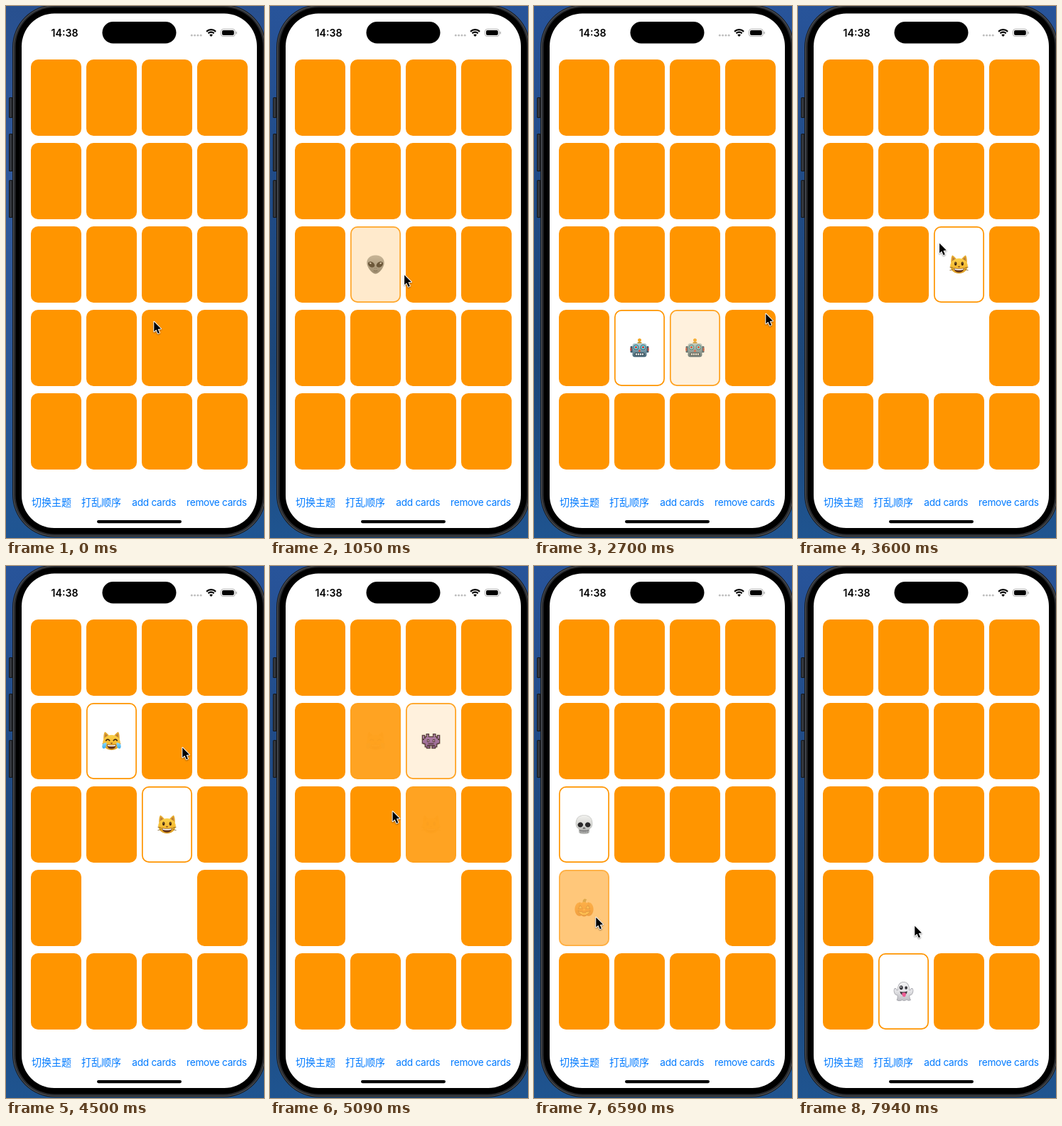
An HTML page with a canvas that plays this animation: 363 px wide and 746 px high, repeating every 8000 ms.

```html
<!DOCTYPE html>
<html lang="zh">
<head>
<meta charset="utf-8">
<title>Memory cards</title>
<style>
  html, body { margin: 0; width: 100%; height: 100%; overflow: hidden; background: #1d477e; }
  canvas { display: block; width: 363px; height: 746px; }
</style>
</head>
<body>
<canvas id="stage"></canvas>
<script>
const W = 363, H = 746, LOOP = 8000, STEP = 150, FADE = 350;
const ORANGE = '#ff9500', BLUE = '#007aff';
const canvas = document.getElementById('stage');
const ratio = window.devicePixelRatio || 1;
canvas.width = W * ratio;
canvas.height = H * ratio;
const stage = canvas.getContext('2d');

// ---------- drawing helpers ----------
function box(g, x, y, w, h, r, fill) {
  g.beginPath();
  g.roundRect(x, y, w, h, r);
  if (fill) { g.fillStyle = fill; g.fill(); }
}
function oval(g, x, y, rx, ry, fill, tilt = 0) {
  g.beginPath();
  g.ellipse(x, y, rx, ry, tilt, 0, Math.PI * 2);
  g.fillStyle = fill;
  g.fill();
}
function shape(g, d, fill, stroke, width = 1) {
  const p = new Path2D(d);
  if (fill) { g.fillStyle = fill; g.fill(p); }
  if (stroke) { g.strokeStyle = stroke; g.lineWidth = width; g.stroke(p); }
}
function mirror(g, draw) {
  draw();
  g.save(); g.scale(-1, 1); draw(); g.restore();
}
function shade(g, y0, y1, ...colors) {
  const s = g.createLinearGradient(0, y0, 0, y1);
  colors.forEach((c, i) => s.addColorStop(i / (colors.length - 1), c));
  return s;
}

// ---------- emoji, centred on 0,0, about 26 px wide ----------
function catHead(g) {
  mirror(g, () => {
    shape(g, 'M-11 1 Q-12 -9 -9.5 -13 Q-7 -12 -3 -7 Z', '#e5a92e');
    shape(g, 'M-9.5 -4 L-8.8 -10.5 L-5 -7 Z', '#b97a3a');
  });
  oval(g, 0, 2, 12.3, 10.6, shade(g, -9, 13, '#fbd24c', '#f6bd35', '#d99a25'));
  mirror(g, () => shape(g, 'M-8 5 L-13 3.5 M-8 7 L-13 8', null, '#7c5a20', .7));
  shape(g, 'M-1.8 2.4 L1.8 2.4 L0 4.2 Z', '#7a4021');
}

const emoji = {
  alien(g) {
    shape(g, 'M0 -13 C8 -13 12.5 -8 12.2 -2 C12 4 5 13 0 13 C-5 13 -12 4 -12.2 -2 C-12.5 -8 -8 -13 0 -13 Z',
      shade(g, -13, 13, '#a9adac', '#8c9190', '#686d6d'));
    mirror(g, () => {
      oval(g, -5.9, 0, 5.1, 3.6, '#191b1c', .55);
      oval(g, -7.2, -1.8, 1.4, .9, '#d8dddd', .5);
      oval(g, -1, 5.3, .5, .7, '#484c4c');
    });
    shape(g, 'M-2.8 8.4 Q0 10 2.8 8.4', null, '#3c4040', 1);
  },
  cat(g) {
    catHead(g);
    mirror(g, () => {
      oval(g, -4.8, -1.2, 1.7, 2.7, '#40270f');
      oval(g, -5.1, -2.2, .6, .8, '#a98755');
    });
    shape(g, 'M-7 5 Q0 6.7 7 5 Q6.4 11 0 11 Q-6.4 11 -7 5 Z', '#603018');
    shape(g, 'M-6.3 5.6 Q0 7 6.3 5.6 L5.8 7.4 Q0 8.6 -5.8 7.4 Z', '#fff');
  },
  tears(g) {
    catHead(g);
    shape(g, 'M-6.5 4.6 Q0 6.2 6.5 4.6 Q6 11 0 11 Q-6 11 -6.5 4.6 Z', '#603018');
    shape(g, 'M-5.8 5.2 Q0 6.5 5.8 5.2 L5.3 7 Q0 8 -5.3 7 Z', '#fff');
    mirror(g, () => {
      shape(g, 'M-8.2 -.2 Q-5.5 -4.5 -2.4 -.2', null, '#40270f', 1.6);
      shape(g, 'M-7 2 Q-13.6 2.5 -13.2 8 Q-12.6 11.6 -9.3 10 Q-7 8 -7 2 Z',
        shade(g, 2, 11, '#8edcff', '#35a9ec'));
    });
  },
  robot(g) {
    box(g, -1, -10, 2, 4, 0, '#83939b');
    box(g, -3, -8.4, 6, 2.5, 1, '#c59a35');
    oval(g, 0, -11, 2.5, 2.3, '#f3a51c');
    mirror(g, () => {
      box(g, -13, -2.5, 3.5, 9, 1.4, '#39596c');
      oval(g, -12.2, 2, 1.1, 2.8, '#bd4a3e');
    });
    box(g, -10, -6.5, 20, 19.3, 3, shade(g, -6.5, 13, '#b4d0d8', '#779ba8', '#486575'));
    mirror(g, () => {
      oval(g, -5, -1, 3.7, 3.7, '#304955');
      oval(g, -5, -1, 3, 3, '#70e4f1');
      oval(g, -5, -1, 1.5, 1.5, '#d8302a');
    });
    shape(g, 'M0 2 L2 5.2 L-2 5.2 Z', '#df4b35');
    box(g, -6.8, 6.8, 13.6, 4, 1.2, '#283a43');
    for (let x = -5.7; x < 5; x += 3) box(g, x, 7.6, 2.3, 2.4, .3, '#e8eff0');
  },
  monster(g) {
    const body = (grow, fill) => mirror(g, () => {
      const part = (x, y, w, h) => box(g, x - grow, y - grow, w + grow * 2, h + grow * 2, 0, fill);
      part(-7.6, -5.4, 7.6, 11);
      part(-9.5, -3.4, 2, 6.8);
      part(-11.5, -1.4, 2, 4);
      part(-11.5, -7.4, 2, 4);
      part(-5.7, -9.2, 2, 4);
      part(-7.6, 5.6, 2.2, 2);
      part(-5.4, 7.6, 3.4, 1.8);
    });
    body(1.3, '#211528');
    body(0, shade(g, -9, 9, '#9b70bb', '#754499'));
    mirror(g, () => {
      box(g, -5.6, -2.4, 3.2, 3.8, 0, '#21142a');
      box(g, -4.6, -1.4, 1.3, 1.8, 0, '#d8b0e8');
      box(g, -4, 3, 4, 1.6, 0, '#2d1939');
    });
  },
  skull(g) {
    const bone = shade(g, -13, 13, '#f1f1ee', '#d7d8d5', '#a7a8a5');
    shape(g, 'M0 -13 C9 -13 12 -7 11.5 0 C11.2 4 9 5 7.5 6 L7 11 Q6 13 0 13 Q-6 13 -7 11 L-7.5 6 C-9 5 -11.2 4 -11.5 0 C-12 -7 -9 -13 0 -13 Z',
      bone, '#b7b8b5', .6);
    mirror(g, () => {
      oval(g, -5.2, .4, 3.8, 3.5, '#29282a', -.2);
      shape(g, 'M-.3 3.2 L-1.8 6 L-.3 6 Z', '#343234');
    });
    shape(g, 'M-6.5 8.2 Q0 9.6 6.5 8.2', null, '#5d5c5d', .9);
    for (let x = -4.5; x <= 4.5; x += 3) shape(g, `M${x} 7.8 V11.8`, null, '#747374', .7);
  },
  pumpkin(g) {
    shape(g, 'M-2 -8 Q-2 -12 1 -13 L4 -11.8 Q2 -10.5 2.5 -7 Z', '#75813a');
    const skin = shade(g, -9, 12, '#f6a02c', '#e87910', '#b9500b');
    mirror(g, () => oval(g, -6.3, 1.8, 6.8, 9.6, skin));
    oval(g, 0, 1.8, 6.8, 10.3, skin);
    mirror(g, () => {
      shape(g, 'M-5.8 -8 Q-9.5 1 -6 11', null, '#c35d0b', .7);
      shape(g, 'M-8 1 L-5.2 -4 L-2.5 .8 Z', '#ffe151', '#78340a', .7);
    });
    shape(g, 'M0 1 L1.5 3.2 L-1.5 3.2 Z', '#ffe151');
    shape(g, 'M-8.5 4 Q-4 6 -3 5 L-2 6.8 L2 6.8 L3 5 Q4 6 8.5 4 Q6 10 0 10 Q-6 10 -8.5 4 Z', '#ffe151', '#78340a', .7);
  },
  ghost(g) {
    shape(g, 'M0 -13 C6.4 -13 8 -8 8 -2 Q10 -1 10.6 -4 Q13.4 -5 13.5 -1 Q13 5 8.4 5.5 Q8.2 10 10 12 Q6.8 13.8 4.5 11.5 Q1 14.5 -2 12 Q-6 14.5 -9.4 12 Q-8 9 -8.4 5.5 Q-13 5 -13.5 -1 Q-13.4 -5 -10.6 -4 Q-10 -1 -8 -2 C-8 -8 -6.4 -13 0 -13 Z',
      shade(g, -13, 13, '#f4f4f5', '#e3e3e6', '#bcbcc2'), '#a6a6ac', .8);
    oval(g, -3.3, -5.3, 2.5, 3, '#333238');
    oval(g, 3.6, -5, 1.8, 2.1, '#333238');
    oval(g, -3.7, -6, .8, 1, '#eee');
    shape(g, 'M-5.2 .1 Q0 1.8 5.2 -.3 Q5 5 0 5 Q-4.2 5 -5.2 .1 Z', '#39323a');
    shape(g, 'M-2.4 2.4 Q.5 1 3.3 2.2 L3 6.4 Q1 9 -1.5 6.5 Z', '#ee5d94');
  }
};

const SPRITE = 34, DETAIL = 2 * ratio;
const sprites = {};
for (const name in emoji) {
  const c = document.createElement('canvas');
  c.width = c.height = SPRITE * DETAIL;
  const g = c.getContext('2d');
  g.scale(DETAIL, DETAIL);
  g.translate(SPRITE / 2, SPRITE / 2);
  emoji[name](g);
  sprites[name] = c;
}

// ---------- timeline ----------
// Each flip time turns the card over; a matched card fades out at "gone".
const played = [
  { face: 'alien', col: 1, row: 2, flips: [800, 1775, 5100, 5860] },
  { face: 'cat', col: 2, row: 2, flips: [1250, 1805, 3230, 4680] },
  { face: 'robot', col: 1, row: 3, flips: [1787], gone: 3230 },
  { face: 'robot', col: 2, row: 3, flips: [2430], gone: 3230 },
  { face: 'tears', col: 1, row: 1, flips: [3930, 4680] },
  { face: 'monster', col: 2, row: 1, flips: [4680, 5860] },
  { face: 'skull', col: 0, row: 2, flips: [5860, 7200] },
  { face: 'pumpkin', col: 0, row: 3, flips: [6420, 7200] },
  { face: 'ghost', col: 1, row: 4, flips: [7200] }
];
const pointer = [
  [0, 208, 442], [300, 207, 443], [750, 150, 372], [850, 150, 374], [1200, 214, 378],
  [1300, 214, 380], [1740, 160, 484], [1950, 202, 491], [2400, 214, 484], [2700, 326, 431],
  [3180, 226, 376], [3400, 222, 370], [3900, 156, 262], [4050, 158, 260], [4500, 248, 254],
  [4700, 236, 258], [5060, 154, 368], [5200, 150, 374], [5550, 95, 441], [5690, 94, 432],
  [5840, 77, 401], [6000, 76, 402], [6390, 84, 490], [6590, 87, 492], [6740, 92, 500],
  [7170, 150, 604], [7300, 156, 608], [7640, 222, 631], [7790, 216, 629], [7940, 164, 504]
];

const ease = x => { x = Math.min(1, Math.max(0, x)); return x * x * (3 - 2 * x); };
const since = (t, start) => ease((t - start) / FADE);
const faceLevel = (card, t) =>
  card.flips.reduce((p, at, i) => p + (i % 2 ? -1 : 1) * since(t, at), 0);

function pointerAt(t) {
  const i = pointer.findIndex(k => k[0] > t);
  if (i < 0) return pointer[pointer.length - 1].slice(1);
  const [t0, x0, y0] = pointer[i - 1], [t1, x1, y1] = pointer[i];
  const k = ease((t - t0) / (t1 - t0));
  return [x0 + (x1 - x0) * k, y0 + (y1 - y0) * k];
}

function stepped(t) {
  const base = t < 5690 ? 0 : 5690;
  return base + Math.floor((t - base) / STEP) * STEP;
}

// ---------- scene ----------
function drawPhone(g, t) {
  g.fillStyle = t < 450
    ? shade(g, 0, H, '#28508f', '#30599c', '#2b5797', '#1f5592')
    : shade(g, 0, H, '#28549a', '#204b86', '#1c4678', '#1f5490');
  g.fillRect(0, 0, W, H);
  for (const [y, h] of [[128, 29], [179, 53], [244, 53]]) {
    box(g, 4, y, 7, h, 1.5, '#17191d');
    box(g, 5, y + 1, 3, h - 2, 1, '#33373d');
  }
  box(g, 9, -2, 357, 747, 60, '#17191c');
  box(g, 10, -1, 355, 745, 59, '#50545a');
  box(g, 11, 0, 353, 743, 58, '#292b2f');
  box(g, 13.5, 2, 348, 738.5, 55, '#000');
  box(g, 22, 10.5, 331, 721.5, 46, '#fff');
  box(g, 135.5, 22, 104, 30.5, 15.25, '#000');
  box(g, 128, 721, 119, 4.2, 2.1, '#000');
}

function drawStatus(g) {
  g.textAlign = 'center';
  g.fillStyle = '#000';
  g.font = '600 14.2px Inter, sans-serif';
  g.letterSpacing = '0px';
  g.fillText('14:38', 82.5, 42.5);
  for (let i = 0; i < 4; i++) oval(g, 261.3 + i * 4.3, 41.2, 1.4, 1.4, '#bdbdbd');

  g.strokeStyle = '#000';
  g.lineWidth = 2.2;
  for (const r of [9.2, 5.7]) {
    g.beginPath();
    g.arc(288.6, 42.4, r, -Math.PI * .75, -Math.PI * .25);
    g.stroke();
  }
  shape(g, 'M288.6 43 L286.2 40.5 Q288.6 38.4 291 40.5 Z', '#000');

  box(g, 302.4, 32.4, 20, 10.2, 3.3);
  g.strokeStyle = '#a5a5a5';
  g.lineWidth = .9;
  g.stroke();
  box(g, 304, 34, 16.8, 7, 2, '#000');
  box(g, 323.6, 35.8, 1.2, 3.6, .6, '#a5a5a5');
}

function drawButtons(g) {
  g.fillStyle = BLUE;
  g.font = '14px "Noto Sans CJK SC", "Noto Sans CJK", sans-serif';
  g.fillText('切换主题', 64, 700.6);
  g.fillText('打乱顺序', 134, 700.6);
  g.font = '13.7px Inter, sans-serif';
  g.letterSpacing = '-0.3px';
  g.fillText('add cards', 208.2, 700.6);
  g.fillText('remove cards', 296.4, 700.6);
  g.letterSpacing = '0px';
}

function drawCard(g, col, row, t) {
  const card = played.find(c => c.col === col && c.row === row);
  const x = 35 + col * 78, y = 75 + row * 117, w = 71, h = 107;
  const up = card ? faceLevel(card, t) : 0;
  const shown = card && card.gone ? 1 - since(t, card.gone) : 1;
  if (up > 0) {
    g.globalAlpha = up * shown;
    box(g, x + .85, y + .85, w - 1.7, h - 1.7, 9.3, '#fff');
    g.strokeStyle = ORANGE;
    g.lineWidth = 1.7;
    g.stroke();
    g.drawImage(sprites[card.face], x + (w - SPRITE) / 2, y + (h - SPRITE) / 2, SPRITE, SPRITE);
  }
  g.globalAlpha = Math.max(0, 1 - up) * shown;
  box(g, x, y, w, h, 10.1, ORANGE);
  g.globalAlpha = 1;
}

function drawPointer(g, t) {
  const [x, y] = pointerAt(t);
  g.save();
  g.translate(x, y);
  g.lineJoin = 'round';
  g.shadowColor = 'rgba(0,0,0,.35)';
  g.shadowBlur = 2 * ratio;
  g.shadowOffsetY = ratio;
  const arrow = 'M.3 .8 V14.6 L3.4 11.7 L5.8 17.2 L8 16.2 L5.7 10.9 L10 10.6 Z';
  shape(g, arrow, '#fff', '#fff', 2);
  g.shadowColor = 'transparent';
  shape(g, arrow, '#000');
  g.restore();
}

function draw(t) {
  stage.setTransform(ratio, 0, 0, ratio, 0, 0);
  drawPhone(stage, t);
  drawStatus(stage);
  for (let row = 0; row < 5; row++)
    for (let col = 0; col < 4; col++) drawCard(stage, col, row, t);
  drawButtons(stage);
  drawPointer(stage, t);
}

const start = performance.now();
function tick() {
  draw(stepped((performance.now() - start) % LOOP));
  requestAnimationFrame(tick);
}
tick();
</script>
</body>
</html>
```
